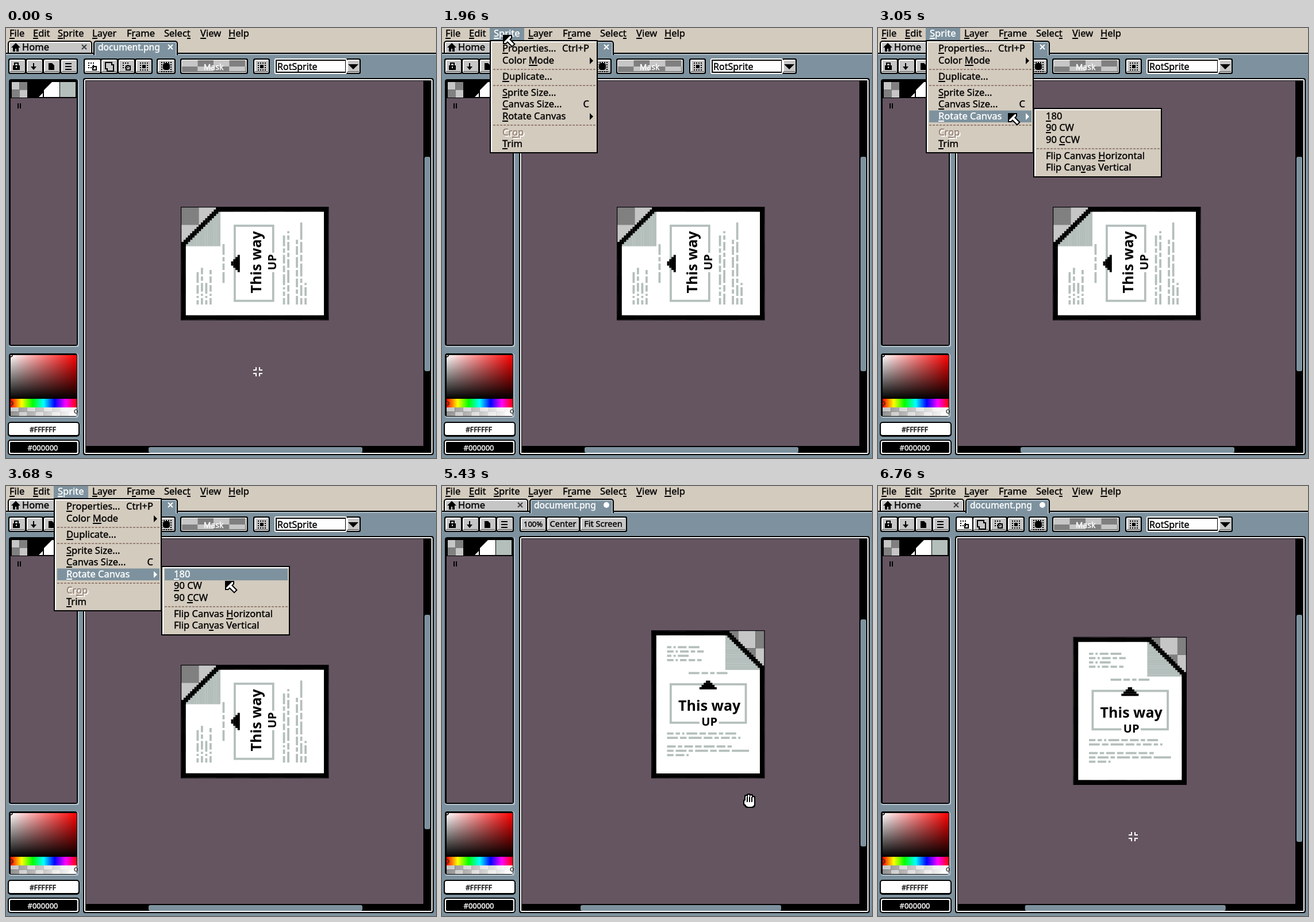
Recreate the animation shown at these times as an HTML page with a canvas. Size 748 px wide and 748 px high, loop 8360 ms.

```html
<!DOCTYPE html>
<html lang="en">
<head>
<meta charset="utf-8">
<title>Rotating a canvas in a sprite editor</title>
<style>
  html, body { margin: 0; width: 100%; height: 100%; overflow: hidden; background: #7d929e; }
  canvas { display: block; }
</style>
</head>
<body>
<canvas id="stage" width="748" height="748"></canvas>
<script>
const ctx = document.getElementById('stage').getContext('2d');
const LOOP = 8360;
const BEIGE = '#d3cbbe', BLUE = '#7d929e', PLUM = '#655561', FACE = '#c6c6c6';
const PALE = '#b4bfbc', DARK = '#808080', BLACK = '#000', WHITE = '#fff';

// Times of the hard changes
const MENU = 1960, SUBMENU = 3020, CLICK = 4770, ROTATED = 4800, SHOWN = 4900;
const HAND = 5380, DRAG = 5470, RELEASE = 6020;

// ---------- motion ----------
const inOut = u => 0.5 - 0.5 * Math.cos(Math.PI * u);
const out = u => 1 - (1 - u) ** 2;
const moves = [
  { from: 800, to: 1630, ease: inOut, path: [[438, 598], [170, 560], [210, 176], [94, 38]] },
  { from: 1660, to: 1930, ease: inOut, path: [[94, 38], [106, 12]] },
  { from: 2340, to: 3020, ease: out, path: [[106, 12], [171, 130], [226, 148]] },
  { from: 3290, to: 3980, ease: inOut, path: [[226, 148], [380, 164], [450, 174]] },
  { from: 5070, to: 5420, ease: inOut, path: [[450, 174], [520, 360], [534, 547]] },
  { from: DRAG, to: 5810, ease: inOut, path: [[534, 547], [509.5, 558.5]] },
  { from: RELEASE, to: 6760, ease: inOut, path: [[509.5, 558.5], [444, 609.5]] }
];

function bezier(points, s) {
  while (points.length > 1) {
    points = points.slice(1).map((p, i) => p.map((v, k) => points[i][k] + (v - points[i][k]) * s));
  }
  return points[0];
}

function pointer(t) {
  const move = moves.filter(m => t >= m.from).pop() || moves[0];
  const u = Math.min(1, Math.max(0, (t - move.from) / (move.to - move.from)));
  return bezier(move.path, move.ease(u));
}

// ---------- drawing helpers ----------
function rect(x, y, w, h, color) {
  ctx.fillStyle = color;
  ctx.fillRect(x, y, w, h);
}

function round(x, y, w, h, color, r = 3) {
  ctx.fillStyle = color;
  ctx.beginPath();
  ctx.roundRect(x, y, w, h, r);
  ctx.fill();
}

function poly(points, fill, stroke, width = 2) {
  ctx.beginPath();
  points.forEach(([x, y]) => ctx.lineTo(x, y));
  ctx.closePath();
  if (stroke) {
    ctx.strokeStyle = stroke;
    ctx.lineWidth = width;
    ctx.stroke();
  }
  ctx.fillStyle = fill;
  ctx.fill();
}

function frame(x, y, w, h, color, line = 2) {
  ctx.strokeStyle = color;
  ctx.lineWidth = line;
  ctx.strokeRect(x + line / 2, y + line / 2, w - line, h - line);
}

function checker(x, y, w, h, cw, ch, a, b) {
  for (let j = 0; j * ch < h; j++)
    for (let i = 0; i * cw < w; i++)
      rect(x + i * cw, y + j * ch, Math.min(cw, w - i * cw), Math.min(ch, h - j * ch), (i + j) % 2 ? b : a);
}

// An "&" in the label underlines the letter after it.
function label(s, x, y, { color = BLACK, size = 16.5, align = 'left' } = {}) {
  const mark = s.indexOf('&');
  const plain = s.replace('&', '');
  ctx.font = `${size}px "Noto Sans", sans-serif`;
  ctx.textAlign = align;
  ctx.fillStyle = ctx.strokeStyle = color;
  ctx.lineWidth = 0.4;
  ctx.fillText(plain, x, y);
  ctx.strokeText(plain, x, y);
  if (mark >= 0) {
    const start = ctx.measureText(plain.slice(0, mark)).width;
    rect(Math.round(x + start), y + 2, Math.round(ctx.measureText(plain[mark]).width), 2, color);
  }
}

function button(x, y, w, h, face = FACE) {
  round(x, y, w, h, BLACK);
  round(x + 2, y + 2, w - 4, h - 4, WHITE, 2);
  rect(x + 4, y + 4, w - 6, h - 8, face);
  rect(x + 3, y + h - 5, w - 6, 2, DARK);
}

function cross(x, y, color) {
  ctx.strokeStyle = color;
  ctx.lineWidth = 2;
  ctx.beginPath();
  ctx.moveTo(x - 4, y - 4); ctx.lineTo(x + 4, y + 4);
  ctx.moveTo(x + 4, y - 4); ctx.lineTo(x - 4, y + 4);
  ctx.stroke();
}

// ---------- top of the window ----------
const menuBar = [['&File', 6], ['&Edit', 47], ['&Sprite', 90], ['&Layer', 150],
  ['F&rame', 210], ['Selec&t', 275], ['&View', 338], ['&Help', 387]];

function drawTop(t, spriteLit) {
  rect(0, 0, 748, 44, BEIGE);
  if (spriteLit) rect(83, 0, 60, 21, BLUE);
  menuBar.forEach(([s, x]) =>
    label(s, x, 15, { color: spriteLit && s === '&Sprite' ? WHITE : BLACK }));

  rect(0, 43, 748, 2, BLACK);
  rect(0, 45, 748, 2, '#a9bac4');
  round(3, 22, 147, 23, BLACK, [5, 5, 0, 0]);
  round(5, 24, 143, 19, WHITE, [3, 3, 0, 0]);
  rect(7, 26, 140, 17, FACE);
  poly([[9, 34], [17, 26], [25, 34], [22, 34], [22, 41], [18, 41], [18, 36], [16, 36], [16, 41], [12, 41], [12, 34]], BLACK);
  label('Home', 28, 39);
  cross(136, 33, '#404040');

  round(152, 22, 147, 25, BLACK, [5, 5, 0, 0]);
  round(154, 24, 143, 24, '#a9bac4', [3, 3, 0, 0]);
  rect(156, 26, 139, 22, BLUE);
  label('document.png', 160, 39, { color: WHITE, size: 15.6 });
  if (t < ROTATED) cross(286, 33, WHITE);
  else round(281, 28, 10, 10, WHITE, 5);
}

function drawFileButtons() {
  [4, 34, 64, 94].forEach(x => button(x, 53, 31, 27));
  rect(12, 65, 12, 8, BLACK);
  frame(14, 60, 8, 8, BLACK);
  rect(17, 67, 2, 3, FACE);
  rect(47, 61, 2, 11, BLACK);
  poly([[43, 67], [53, 67], [48, 73]], BLACK);
  poly([[74, 61], [80, 61], [84, 65], [84, 73], [74, 73]], BLACK);
  [61, 66, 71].forEach(y => rect(103, y, 11, 2, BLACK));
}

function dotted(x, y, n) {
  for (let i = 0; i < n; i++) {
    [[i, 0], [i, n - 1], [0, i], [n - 1, i]].forEach(([a, b]) => rect(x + a * 4, y + b * 4, 2, 2, BLACK));
  }
}

function drawSelectionBar() {
  [135, 164, 194, 224].forEach((x, i) => button(x, 53, 31, 27, i ? FACE : WHITE));
  dotted(143, 60, 3);
  frame(150, 66, 8, 8, BLACK);
  poly([[174, 61], [183, 61], [183, 65], [186, 65], [186, 74], [177, 74], [177, 70], [174, 70]], FACE, BLACK, 4);
  dotted(203, 60, 3);
  frame(208, 65, 9, 9, BLACK);
  dotted(233, 60, 4);
  rect(237, 64, 6, 6, BLACK);

  button(262, 53, 33, 27);
  dotted(270, 59, 5);
  round(273, 61, 12, 12, BLACK, 4);

  button(303, 53, 118, 27);
  checker(306, 56, 111, 19, 27.5, 11, FACE, DARK);
  label('Mask', 361, 73, { color: WHITE, size: 14, align: 'center' });

  button(430, 53, 29, 27);
  dotted(438, 60, 4);
  rect(442, 64, 6, 6, BLACK);

  button(591, 53, 26, 27);
  poly([[595, 63], [613, 63], [604, 72]], BLACK);
  round(467, 53, 126, 27, WHITE);
  rect(469, 55, 122, 23, BLACK);
  rect(471, 57, 119, 19, WHITE);
  label('RotSprite', 472, 73, { size: 16 });
}

function drawHandBar() {
  [['100%', 135, 47], ['Center', 181, 59], ['Fit Screen', 239, 83]].forEach(([s, x, w]) => {
    button(x, 53, w, 27);
    label(s, x + w / 2, 71, { size: s === '100%' ? 13 : 14.6, align: 'center' });
  });
}

// ---------- left panel ----------
function gradient(x, y, w, h, vertical, stops) {
  const g = vertical ? ctx.createLinearGradient(0, y, 0, y + h) : ctx.createLinearGradient(x, 0, x + w, 0);
  stops.forEach((c, i) => g.addColorStop(i / (stops.length - 1), c));
  rect(x, y, w, h, g);
}

function ring(x, y, color) {
  ctx.strokeStyle = color;
  ctx.lineWidth = 1.5;
  ctx.beginPath();
  ctx.arc(x, y, 3, 0, 7);
  ctx.stroke();
}

function panel(x, y, w, h, fill) {
  round(x, y, w, h, '#b5c5cf', 4);
  round(x, y, w - 2, h - 2, BLACK, 4);
  rect(x + 3, y + 3, w - 7, h - 7, fill);
}

function drawLeft() {
  panel(5, 89, 122, 466, PLUM);
  rect(8, 92, 115, 30, BLACK);
  checker(10, 94, 27, 27, 13.5, 13.5, FACE, DARK);
  rect(66, 94, 27, 26, WHITE);
  poly([[66, 94], [80, 94], [66, 108]], BLACK);
  poly([[64, 113], [64, 120], [57, 120]], WHITE);
  rect(94, 94, 27, 26, PALE);
  rect(20, 131, 2, 9, BLACK);
  rect(24, 131, 2, 9, BLACK);

  panel(5, 566, 121, 112, BLACK);
  gradient(8, 569, 115, 76, false, [WHITE, '#f00']);
  gradient(8, 569, 115, 76, true, ['#0000', BLACK]);
  gradient(8, 645, 115, 15, false, ['#f00', '#ff0', '#0f0', '#0ff', '#00f', '#f0f', '#f00']);
  checker(8, 660, 115, 15, 14.4, 7.5, FACE, '#929292');
  gradient(8, 660, 115, 15, false, ['#fff0', WHITE]);
  ctx.save();
  ctx.beginPath();
  ctx.rect(7, 568, 118, 108);
  ctx.clip();
  ring(8, 569, BLACK);
  ring(9, 653, '#502010');
  ring(122, 667, '#505050');
  ctx.restore();

  round(3, 685, 125, 26, BLACK, 5);
  round(5, 687, 121, 21, WHITE, 3);
  label('#FFFFFF', 64, 703, { size: 12.3, align: 'center' });
  round(3, 716, 125, 27, BLACK, 5);
  round(5, 718, 121, 23, WHITE, 3);
  round(7, 720, 117, 19, BLACK, 2);
  label('#000000', 64, 735, { color: WHITE, size: 13, align: 'center' });
}

// ---------- document ----------
const U = 3.755;
const textRows = [
  [7, 7, '-- - ---- -----'], [7, 9, '--- - ---- -- ---'], [7, 11, '-- - -----'], [7, 13, '--- - --- --- --'],
  [17, 19, '----- --- -- -----'],
  [7, 47, '--- -- - ----- --- ---- -- -----'], [7, 49, '----- --- ------ ---- -- ---- -- -'],
  [7, 53, '---- -- ---- --- ----- ---- --'], [7, 55, '--- ----- -- ------ --- ----- --------'], [7, 57, '--- ---- -']
];

function drawPage() {
  const cell = (x, y, w, h, color) => rect(x * U, y * U, w * U, h * U, color);
  poly([[2, 2], [36, 2], [51, 18], [50, 18], [50, 66], [2, 66]].map(p => p.map(v => v * U)), WHITE);
  for (let i = 2; i < 18; i++) cell(34, i, i, 1.05, PALE);
  cell(0, 0, 35, 2, BLACK);
  cell(0, 0, 2, 68, BLACK);
  cell(0, 66, 52, 2, BLACK);
  cell(50, 17, 2, 51, BLACK);
  for (let i = 0; i < 18; i++) cell(33 + i, i, Math.min(3, 19 - i), 1.05, BLACK);

  textRows.forEach(([x, y, row]) => {
    for (const dash of row.matchAll(/-+/g)) cell(x + dash.index, y, dash[0].length, 1, PALE);
  });
  frame(8.2 * U, 24.2 * U, 35.8 * U, 18.8 * U, PALE, U);
  for (let i = 0; i < 4; i++) cell(25 - i, 23 + i, 2 + 2 * i, 1.05, BLACK);
  cell(22, 41, 9, 3, WHITE);

  ctx.fillStyle = BLACK;
  ctx.textAlign = 'center';
  ctx.font = 'bold 25px "Noto Sans", sans-serif';
  ctx.fillText('This way', 100, 139);
  ctx.font = 'bold 20px "Noto Sans", sans-serif';
  ctx.fillText('UP', 100, 165);
}

function drawDocument(x, y, turned) {
  const w = turned ? 197.5 : 257.5, h = turned ? 257.5 : 197.5;
  rect(x, y, w, h, BLACK);
  checker(x + 1.2, y + 1.2, w - 2.4, h - 2.4, 8 * U, 8 * U, DARK, FACE);
  ctx.save();
  if (turned) {
    ctx.translate(x + 1.2, y + 1.2);
  } else {
    ctx.translate(x + 1.2, y + h - 1.2);
    ctx.rotate(-Math.PI / 2);
  }
  drawPage();
  ctx.restore();
}

function drawEditor(t) {
  round(134, 87, 610, 656, BLACK, 4);
  round(136, 89, 606, 652, WHITE, 3);
  rect(138, 91, 602, 648, BLACK);
  rect(139, 92, 587, 635, PLUM);

  const turned = t >= ROTATED;
  let panX = 0, panY = 0;
  if (t >= DRAG) {
    const [x, y] = pointer(Math.min(t, 5810));
    panX = x - 534;
    panY = y - 547;
  }
  if (turned) drawDocument(364 + panX, 251 + panY, true);
  else drawDocument(304, 311, false);

  const left = turned ? 241 - panX * 0.6 : 248;
  const top = turned ? 232 - panY * 0.7 : 224;
  round(728, top, 10, turned ? 395 : 373, BLUE);
  round(left, 729, turned ? 349 : 372, 10, BLUE);
}

// ---------- menus: rows are [label, middle, shortcut] ----------
const spriteMenu = {
  x: 84, y: 21, w: 187, h: 197, lines: [72, 100, 169],
  rows: [['&Properties...', 36, 'Ctrl+P'], ['Color &Mode', 57, '>'], ['&Duplicate...', 85], ['&Sprite Size...', 113],
    ['&Canvas Size...', 133, 'C'], ['&Rotate Canvas', 154, '>'], ['Cr&op', 182, 'off'], ['&Trim', 202]]
};
const rotateMenu = {
  x: 271, y: 139, w: 223, h: 121, lines: [210],
  rows: [['&180', 154], ['&90 CW', 174], ['90 &CCW', 195], ['Flip Canvas &Horizontal', 223], ['Flip Can&vas Vertical', 243]]
};

const rowAt = (menu, [x, y]) => menu.rows.findIndex(([, mid, extra]) =>
  x >= menu.x && x < menu.x + menu.w && Math.abs(y - mid) <= 10.3 && extra !== 'off');

function drawMenu({ x, y, w, h, lines, rows }, lit) {
  rect(x - 1, y, w + 1, h, BLACK);
  rect(x + 1, y + 2, w - 3, h - 4, WHITE);
  rect(x + 3, y + 4, w - 5, h - 6, BEIGE);
  lines.forEach(ly => {
    for (let lx = x + 5; lx < x + w - 6; lx += 6) rect(lx, ly - 1, 4, 2, '#968275');
  });
  rows.forEach(([s, mid, extra], i) => {
    const color = i === lit ? WHITE : BLACK;
    if (i === lit) rect(x + 5, mid - 10.5, w - 9, 20.6, BLUE);
    if (extra === 'off') {
      label(s, x + 23, mid + 7, { color: WHITE });
      label(s, x + 21, mid + 5, { color: '#968275' });
      return;
    }
    label(s, x + 21, mid + 5, { color });
    if (extra === '>') poly([[x + 173, mid - 6], [x + 179, mid], [x + 173, mid + 6]], color);
    else if (extra) label(extra, x + 172, mid + 5, { color, align: 'right' });
  });
}

function drawMenus(t) {
  if (t < MENU || t >= ROTATED) return;
  const hover = pointer(t - 35);
  const open = t >= SUBMENU;
  drawMenu(spriteMenu, open ? 5 : rowAt(spriteMenu, hover));
  if (open) drawMenu(rotateMenu, rowAt(rotateMenu, hover));
}

// ---------- pointers ----------
function drawArrow() {
  ctx.lineJoin = 'miter';
  poly([[2, 2], [14, 2], [14, 5], [11, 8], [19, 16], [16, 19], [8, 11], [5, 14], [2, 14]], WHITE, BLACK, 4);
  poly([[2, 2], [12, 2], [2, 12]], BLACK);
}

function drawCross() {
  for (const sx of [-1, 1]) {
    for (const sy of [-1, 1]) {
      rect(sx * 3 - 1, sy * 5 - 3, 2, 6, WHITE);
      rect(sx * 5 - 3, sy * 3 - 1, 6, 2, WHITE);
    }
  }
}

function drawHand() {
  const shape = grow => {
    const color = grow ? BLACK : WHITE;
    [[-5, -8], [-1, -10], [3, -9], [7, -6]].forEach(([x, y]) =>
      round(x - 1 - grow, y - grow, 3 + 2 * grow, 14 + 2 * grow, color, 2));
    round(-8 - grow, 0 - grow, 4 + 2 * grow, 7 + 2 * grow, color, 2);
    round(-6 - grow, 2 - grow, 15 + 2 * grow, 9 + 2 * grow, color, [1, 1, 5, 5]);
  };
  shape(2);
  shape(0);
  [-3, 1, 5].forEach(x => rect(x - 1, -6, 1.5, 9, BLACK));
}

function drawPointer(t) {
  if (t >= CLICK && t < SHOWN) return;
  const [x, y] = pointer(t);
  const menuOpen = t >= MENU && t < ROTATED;
  ctx.save();
  ctx.translate(Math.round(x), Math.round(y));
  if (menuOpen || x < 139 || y < 92) drawArrow();
  else if (t >= HAND && t < RELEASE) drawHand();
  else drawCross();
  ctx.restore();
}

function draw(t) {
  const spriteLit = t < ROTATED && (t >= MENU || (t > 1660 && pointer(t)[1] < 21));
  rect(0, 0, 748, 748, BLUE);
  drawTop(t, spriteLit);
  drawFileButtons();
  if (t >= HAND && t < RELEASE) drawHandBar();
  else drawSelectionBar();
  drawLeft();
  drawEditor(t);
  drawMenus(t);
  drawPointer(t);
}

const start = performance.now();
function tick() {
  draw((performance.now() - start) % LOOP);
  requestAnimationFrame(tick);
}
tick();
</script>
</body>
</html>
```
